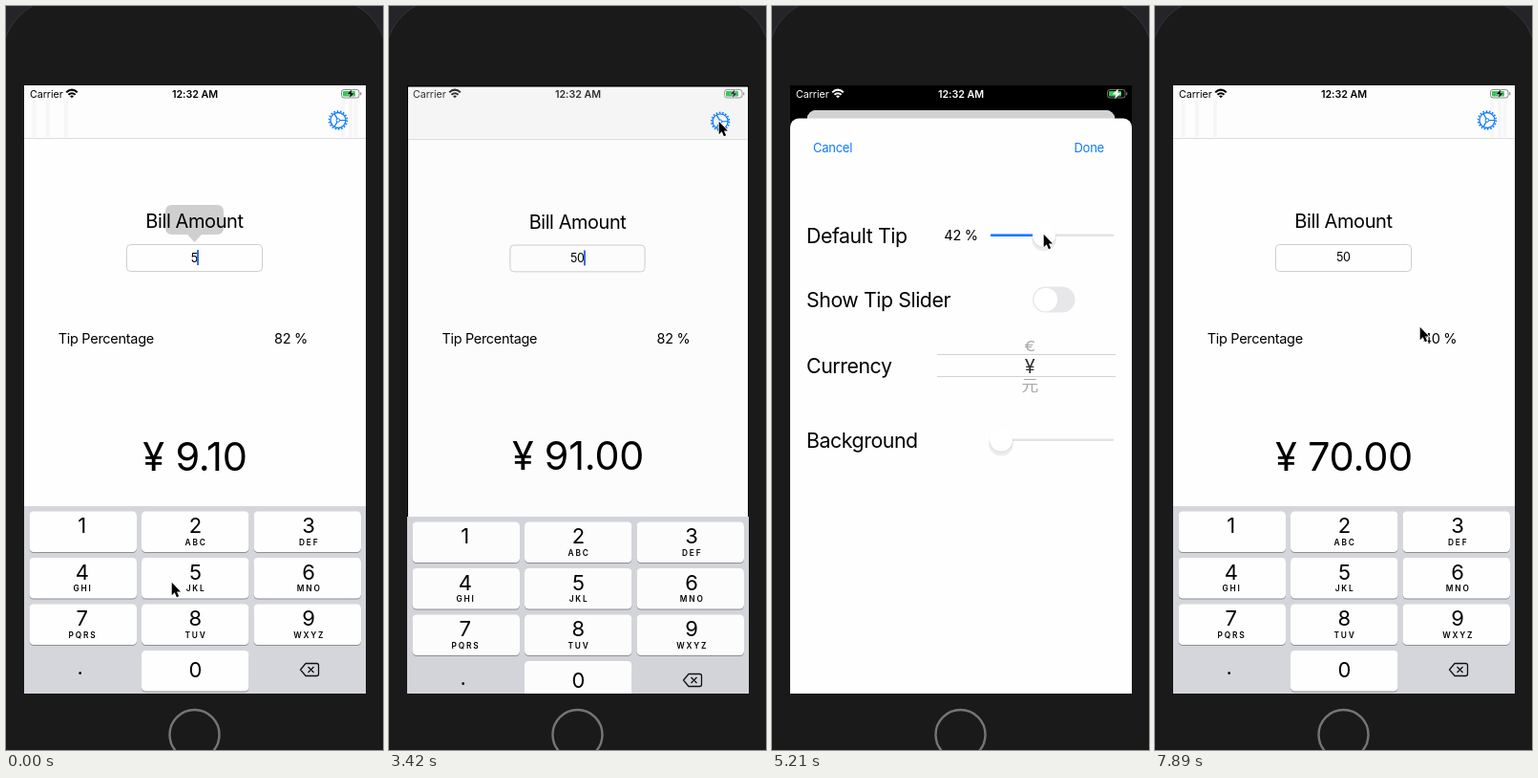
An HTML page for the animation above (8000 ms loop, 395 by 778 pixels).

```html
<!DOCTYPE html>
<html lang="en">
<head>
<meta charset="utf-8">
<title>Tip calculator</title>
<style>
  html, body { margin: 0; width: 100%; height: 100%; overflow: hidden; background: #1a1a1a; }
  svg { display: block; width: 100%; height: 100%; }
  text { font-family: Inter, "Noto Sans CJK SC", "Noto Sans CJK", sans-serif; letter-spacing: -.02em; }
  .mid { text-anchor: middle; }
  .status { font-size: 10.7px; letter-spacing: -.005em; }
  .label { font-size: 21.3px; }
  .row { font-size: 14.5px; }
  .link { font-size: 13px; fill: #0a7aff; }
  .digit { font-size: 22px; }
  .total { font-size: 41.5px; letter-spacing: -.005em; }
  .letters { font-size: 8.3px; font-weight: 600; letter-spacing: 1.8px; }
  .gear { fill: none; stroke: #0a7aff; }
</style>
</head>
<body>
<svg viewBox="0 0 395 778">
  <defs>
    <clipPath id="screen"><rect x="19" y="83" width="358" height="636"/></clipPath>
    <g id="thumb">
      <circle cy="4" r="12.8" fill="#000" opacity=".07"/>
      <circle cy="1" r="12.5" fill="#000" opacity=".06"/>
      <circle r="12" fill="#fff"/>
    </g>
  </defs>

  <rect width="395" height="778" fill="#252529"/>
  <rect x="-4" y="-8" width="403" height="900" rx="62" fill="#1a1a1a" stroke="#363638"/>
  <circle cx="197.5" cy="762" r="26" fill="none" stroke="#757575" stroke-width="2.4"/>

  <g clip-path="url(#screen)">
    <rect x="19" y="83" width="358" height="636"/>

    <g id="home">
      <clipPath id="cardClip"><rect id="cardShape" x="19" y="83" width="358" height="700"/></clipPath>
      <g clip-path="url(#cardClip)">
        <rect x="19" y="83" width="358" height="700" fill="#fefefe"/>
        <rect id="nav" x="19" y="83" width="358" height="55"/>
        <path id="streaks" d="M29.5 98V137M44 98V137M63 98V137M353 98V137M361 98V137M366.500 98V137" stroke="#f6f6f6" stroke-width="4"/>
        <path d="M19 138.500H377" stroke="#dcdcdc"/>
        <g class="gear" transform="translate(348 119.500)">
          <circle r="8" stroke-width="1.300"/>
          <circle r="9.400" stroke-width="1.600" stroke-dasharray="1.640 1.640"/>
          <circle r="1.800" stroke-width="1"/>
          <path d="M1.800 0H8M-.9 -1.600L-4 -6.900M-.9 1.600L-4 6.900" stroke-width="1.200"/>
        </g>
        <path id="popover" d="M174 208H221Q228 208 228 215V232Q228 239 221 239H205L197.500 247L190 239H174Q167 239 167 232V215Q167 208 174 208Z" fill="#cfcfcf"/>
        <text class="mid" x="197.500" y="232" font-size="20">Bill Amount</text>
        <rect x="126.500" y="249.500" width="142" height="28" rx="4" fill="#fff" fill-opacity=".5" stroke="#cfcfcf"/>
        <text class="mid" id="bill" x="197.300" y="267.500" font-size="12.500"></text>
        <rect id="caret" y="255" width="2" height="16" fill="#3b6be0"/>
        <text class="row" x="54.700" y="353">Tip Percentage</text>
        <text class="row mid" id="homeTip" x="298.500" y="353"></text>
        <text class="total mid" id="total" x="198" y="486"></text>
        <rect class="dim" x="19" y="83" width="358" height="700"/>
      </g>
    </g>

    <g id="sheet">
      <rect x="19" y="117.500" width="358" height="640" rx="9" fill="#fefefe"/>
      <text class="link" x="43" y="152.500">Cancel</text>
      <text class="link" x="316.500" y="152.500">Done</text>
      <text class="label" x="36" y="247.500">Default Tip</text>
      <text class="label" x="36" y="315">Show Tip Slider</text>
      <text class="label" x="36" y="384">Currency</text>
      <text class="label" x="36" y="461.500">Background</text>
      <text class="row mid" id="sheetTip" x="198" y="245"></text>

      <g stroke-width="2.500" stroke-linecap="round">
        <path d="M230 239.700H357M230 453.700H357" stroke="#e3e3e5"/>
        <path id="fill" stroke="#0a7aff"/>
      </g>
      <use id="tipThumb" href="#thumb"/>
      <use href="#thumb" x="240" y="453.700"/>

      <rect x="273" y="293.500" width="44.500" height="27" rx="13.500" fill="#e7e7e9"/>
      <circle cx="286.800" cy="307" r="12.300" fill="#fff"/>

      <path d="M173 364.500H360M173 387.500H360" stroke="#d2d2d2"/>
      <text class="mid" transform="translate(270 360.500) scale(1 .8)" font-size="18" fill="#a8a8a8">€</text>
      <text class="mid" x="270" y="383.500" font-size="20" fill="#333">¥</text>
      <text class="mid" transform="translate(270 401.500) scale(1 .8)" font-size="18" fill="#a8a8a8">元</text>
    </g>

    <g id="keyboard">
      <rect x="19" y="523" width="358" height="196" fill="#d4d6dc"/>
      <g id="keys"></g>
      <text class="digit mid" x="77.500" y="699">.</text>
      <path d="M314 687.500H325.500Q327.500 687.500 327.500 689.500V698.500Q327.500 700.500 325.500 700.500H314L308.500 694ZM316.500 691L322.500 697M322.500 691L316.500 697" fill="none" stroke="#111" stroke-width="1.300" stroke-linejoin="round"/>
      <rect class="dim" x="19" y="523" width="358" height="196"/>
    </g>

    <g id="status">
      <text class="status" x="25" y="96">Carrier</text>
      <text class="status mid" x="198" y="96" font-weight="600">12:32 AM</text>
      <g fill="none" stroke="currentColor" stroke-width="2">
        <path d="M63.200 90.200Q69 85 74.800 90.200M65.400 92.800Q69 89.600 72.600 92.800"/>
        <path d="M67 94.200Q69 92.800 71 94.200L69 96.300Z" fill="currentColor" stroke="none"/>
        <rect x="351.500" y="87.500" width="18.500" height="8.500" rx="2.500" stroke-width="1" opacity=".45"/>
        <path d="M371.700 90.300V93.300" stroke-width="1.200" opacity=".45"/>
      </g>
      <rect x="353" y="89" width="13" height="5.500" rx="1" fill="#34c759"/>
      <path d="M362.500 87L357 92.300H360.500L359.500 96.500L365.500 91H362Z" fill="currentColor" stroke="#dff5e4" stroke-width=".5"/>
    </g>
  </g>

  <g id="mouse">
    <path d="M.7 .7V14.200L3.700 11.300L5.900 16.200L8.100 15.300L6 10.500H10Z" stroke="#fff" stroke-width="1.400" paint-order="stroke"/>
  </g>
</svg>
<script>
const LOOP = 8000, STEP = 148.9, LAST = 53;
const TYPED = 9, SAVED = 46, OPEN = 22.86, CLOSE = 46.9;
const $ = id => document.getElementById(id);

// Tracks: [step, value...]
const mousePath = [
  [0, 173, 602], [8, 162, 679], [9, 162, 679], [11, 141, 394], [12, 141, 394],
  [18, 325, 149], [19, 325, 149], [22, 345, 120], [23, 345, 120], [25, 311, 168],
  [27, 324, 230], [30, 320, 243], [35, 284, 238], [41, 283, 238], [42, 283, 238],
  [43, 289, 217], [46, 334, 145], [47, 334, 145], [48, 327, 156], [53, 277, 335]
];
const tipTrack = [[0, 82], [30, 82], [35, 42], [36, 42], [37, 41], [39, 41], [40, 40.6], [41, 40]];

function at(track, s) {
  const i = track.findIndex(k => k[0] > s);
  if (i < 0) return track[track.length - 1].slice(1);
  const a = track[i - 1], b = track[i], u = (s - a[0]) / (b[0] - a[0]);
  return a.slice(1).map((v, j) => v + (b[j + 1] - v) * u);
}

// Critically damped spring, 0 to 1
function spring(steps) {
  const x = Math.max(0, steps) * 2.72;
  return 1 - (1 + x) * Math.exp(-x);
}

// Labels sit on a slightly wider pitch than the keys
const letters = ['', 'ABC', 'DEF', 'GHI', 'JKL', 'MNO', 'PQRS', 'TUV', 'WXYZ'];
function key(digit, sub, col, row) {
  const x = 24.5 + col * 117.5, y = 528.5 + row * 48.5, cx = 198.2 + (col - 1) * 118.6;
  return `<rect x="${x}" y="${y + 1}" width="112.5" height="42.5" rx="4.5" fill="#8d8f94"/>
    <rect x="${x}" y="${y}" width="112.5" height="42.5" rx="4.5" fill="#fefefe"/>
    <text class="digit mid" x="${cx}" y="${y + (digit ? 22.7 : 28)}">${digit}</text>
    <text class="letters mid" x="${cx + .9}" y="${y + 35}">${sub}</text>`;
}
$('keys').innerHTML = letters.map((sub, i) => key(i + 1, sub, i % 3, Math.floor(i / 3))).join('') + key(0, '', 1, 3);

function move(id, x, y, scale = 1) {
  $(id).setAttribute('transform', `translate(${x} ${y}) scale(${scale})`);
}

function caretOn(s) {
  return s < 4 || (s >= 7 && s < 12.8) || (s >= 16 && s < 51);
}

function draw(s) {
  const p = spring(s - OPEN) - spring(s - CLOSE);
  const bill = s < TYPED ? 5 : 50;
  const homeTip = s < SAVED ? 82 : 40;
  const tip = at(tipTrack, s)[0];

  $('bill').textContent = bill;
  $('homeTip').textContent = homeTip + ' %';
  $('total').textContent = '¥ ' + (bill * (1 + homeTip / 100)).toFixed(2);
  $('caret').setAttribute('x', bill < 10 ? 200 : 204);
  $('caret').style.opacity = caretOn(s) ? 1 : 0;
  $('popover').style.opacity = Math.max(0, 1 - s * .7);

  const scale = 1 - .1 * p;
  move('home', 198.2 * (1 - scale), 83 + 26 * p - 83 * scale, scale);
  $('cardShape').setAttribute('rx', 10 * p);
  $('nav').setAttribute('fill', p > .01 ? '#f7f7f7' : '#fdfdfd');
  $('streaks').style.opacity = p > .01 ? 0 : 1;
  document.querySelectorAll('.dim').forEach(el => el.style.opacity = .15 * p);

  move('sheet', 0, Math.round(601 * (1 - p)));
  move('keyboard', 0, Math.round(196 * p));
  const grey = Math.round(255 * Math.min(1, p * 3.5));
  $('status').style.color = $('status').style.fill = `rgb(${grey},${grey},${grey})`;

  const thumbX = 240 + tip * 1.07;
  $('sheetTip').textContent = Math.round(tip) + ' %';
  $('fill').setAttribute('d', `M230 239.7H${thumbX}`);
  move('tipThumb', thumbX, 239.7);
  move('mouse', ...at(mousePath, s));
}

// The picture advances in even steps, like a screen recording
function tick() {
  const ms = performance.now() % LOOP;
  draw(Math.min(LAST, Math.floor((ms + 15) / STEP)));
  requestAnimationFrame(tick);
}
tick();
</script>
</body>
</html>
```
